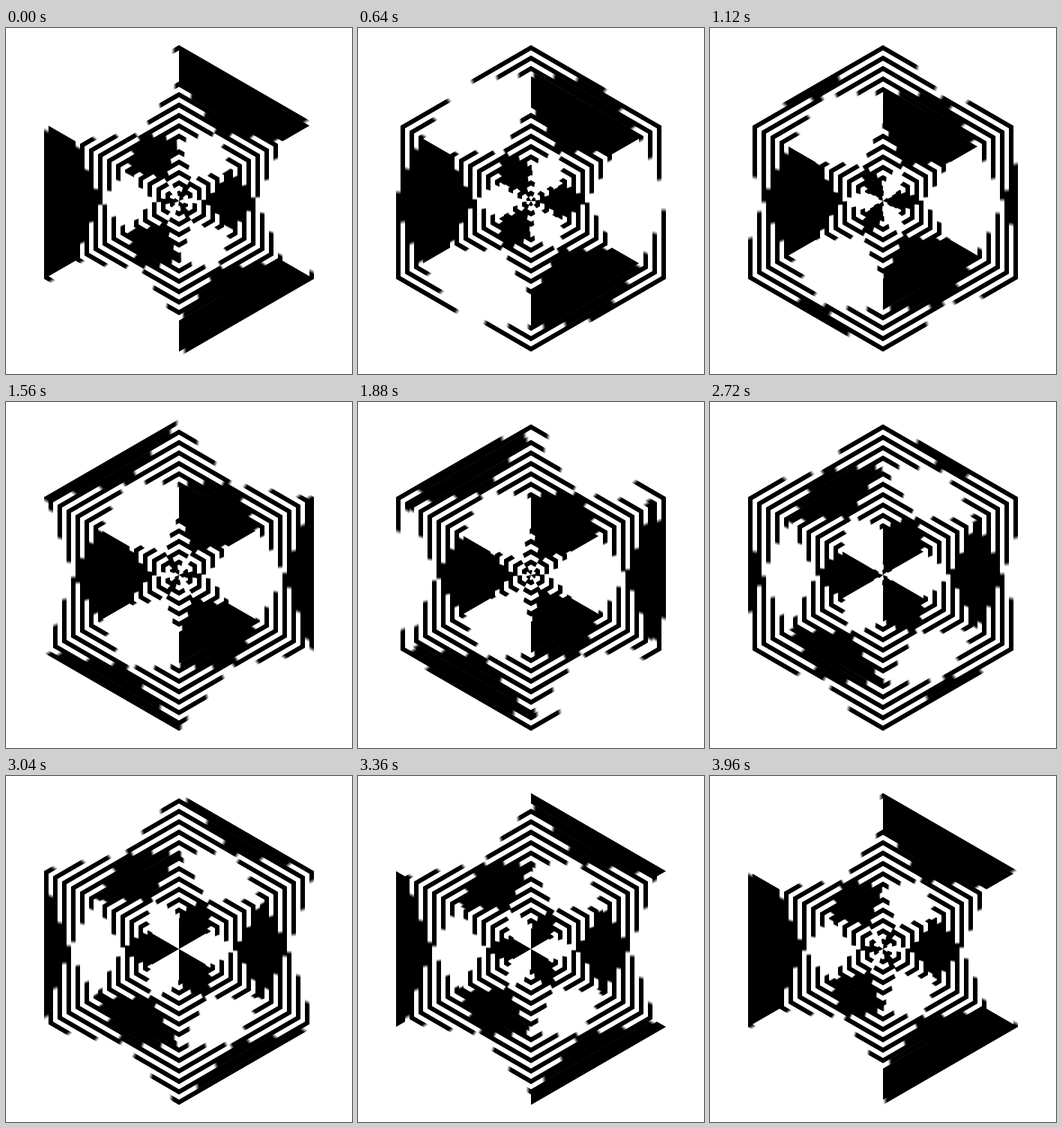
Recreate the animation shown at these times as an HTML page with a canvas. Size 500 by 500 pixels, loop 4000 ms.

```html
<!DOCTYPE html>
<html lang="en">
<head>
<meta charset="utf-8">
<title>Hexagon rings</title>
<style>
  html, body { margin: 0; width: 100%; height: 100%; overflow: hidden; background: #fff; }
  canvas { display: block; width: 500px; height: 500px; }
</style>
</head>
<body>
<canvas id="stage" width="500" height="500"></canvas>
<script>
const ctx = document.getElementById('stage').getContext('2d');
const LOOP = 4000;
const STEP = 40;
const RINGS = 30;
const CENTER = 250;
const RADIUS = 195 / Math.cos(Math.PI / 6);
const TRAVEL = 0.8;   // share of the loop a ring spends moving
const SAMPLES = 15;
const SHUTTER = 48;

function corner(k) {
  const angle = (k * 60 - 90) * Math.PI / 180;
  return [Math.cos(angle), Math.sin(angle)];
}

// Point on a hexagon; pos counts sides clockwise from the top corner.
function hexPoint(pos, r) {
  const k = Math.floor(pos);
  const f = pos - k;
  const [ax, ay] = corner(k);
  const [bx, by] = corner(k + 1);
  return [CENTER + r * (ax + (bx - ax) * f), CENTER + r * (ay + (by - ay) * f)];
}

// Band one side long, bent around any corner it crosses.
function addBand(path, start, outer, inner) {
  const stops = [start];
  for (let k = Math.floor(start) + 1; k < start + 1; k++) stops.push(k);
  stops.push(start + 1);
  stops.forEach((p, n) => {
    const [x, y] = hexPoint(p, outer);
    n ? path.lineTo(x, y) : path.moveTo(x, y);
  });
  stops.reverse().forEach(p => path.lineTo(...hexPoint(p, inner)));
  path.closePath();
}

// Sides travelled by a ring: two per loop, then a rest.
function travel(ring, time) {
  const u = time / LOOP - (ring - 0.5) / RINGS;
  return 2 * Math.min(1, (u - Math.floor(u)) / TRAVEL);
}

function rings(time) {
  const path = new Path2D();
  for (let i = 0; i < RINGS; i++) {
    const outer = RADIUS * (1 - i / RINGS);
    const inner = RADIUS * (1 - (i + 1) / RINGS);
    const shift = travel(i, time) * (i % 2 ? 1 : -1);
    for (let side = 0; side < 6; side += 2) addBand(path, side + shift, outer, inner);
  }
  return path;
}

function draw(time) {
  ctx.globalCompositeOperation = 'lighter';
  ctx.globalAlpha = 1 / SAMPLES;
  ctx.clearRect(0, 0, 500, 500);
  ctx.fillStyle = '#000';
  for (let n = 0; n < SAMPLES; n++) {
    ctx.fill(rings(time + SHUTTER * ((n + 0.5) / SAMPLES - 0.5)));
  }
}

let shown = -1;
function tick(now) {
  const frame = Math.floor((now + 0.5) / STEP) % (LOOP / STEP);
  if (frame !== shown) {
    shown = frame;
    draw(frame * STEP);
  }
  requestAnimationFrame(tick);
}
draw(0);
requestAnimationFrame(tick);
</script>
</body>
</html>
```
